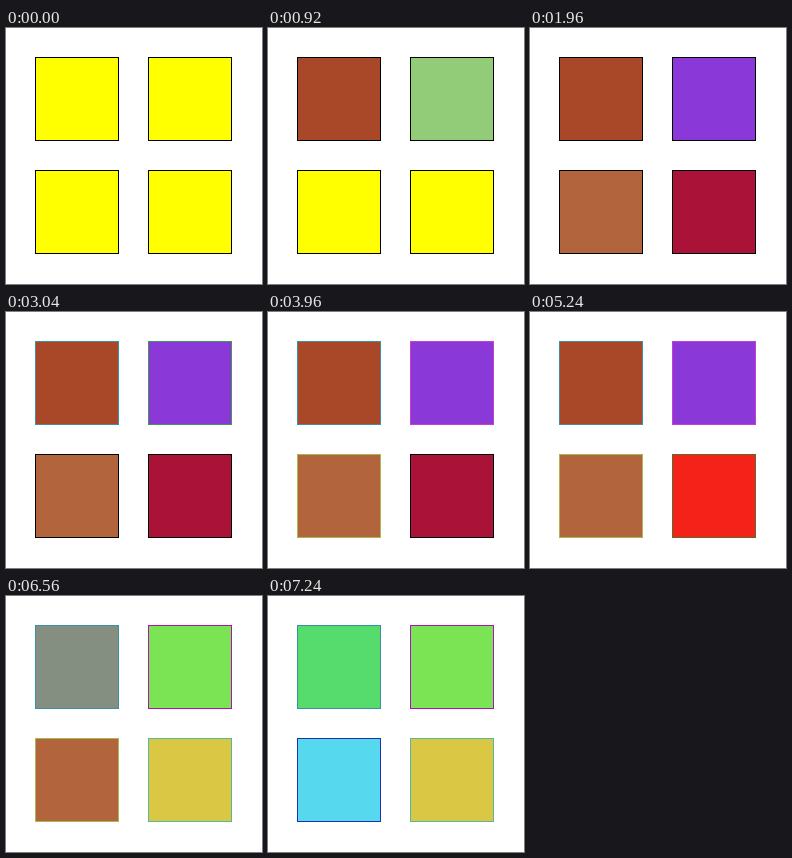
An HTML page with a canvas that plays this animation: 256 by 256 pixels, repeating every 7.32 s.

```html
<!DOCTYPE html>
<html lang="en">
<head>
<meta charset="utf-8">
<title>Four squares</title>
<style>
  html, body { margin: 0; width: 100%; height: 100%; overflow: hidden; background: #fff; }
  canvas { display: block; }
</style>
</head>
<body>
<canvas width="256" height="256"></canvas>
<script>
const ctx = document.querySelector('canvas').getContext('2d');
const LOOP = 7320, TICK = 40, SIZE = 83;
const TL = 0, TR = 1, BL = 2, BR = 3;

// Each run flickers through random colours and settles on the last one:
// [square, property, start, end, steps, settled colour]
const runs = [
  [TL, 'fill', 160, 240, 2, '#a84828'],
  [TR, 'fill', 440, 920, 8, '#92cc78'],
  [TR, 'fill', 960, 1160, 3, '#8a38d8'],
  [BR, 'fill', 1240, 1520, 4, '#aa1238'],
  [BL, 'fill', 1720, 1960, 5, '#b2643c'],
  [TL, 'line', 2320, 2640, 6, '#3c90a4'],
  [TR, 'line', 2840, 3360, 9, '#c83cd0'],
  [BL, 'line', 3560, 3960, 7, '#a8b850'],
  [BR, 'line', 4080, 5040, 15, '#5c6c30'],
  [BR, 'fill', 5240, 5240, 1, '#f42218'],
  [BR, 'line', 5320, 5320, 1, '#54b8a0'],
  [BR, 'fill', 5320, 5440, 3, '#dac844'],
  [TR, 'line', 5760, 5760, 1, '#b010b8'],
  [TR, 'fill', 5760, 5960, 4, '#8ee8fa'],
  [TR, 'fill', 6040, 6240, 4, '#7ae454'],
  [TL, 'fill', 6320, 6680, 6, '#56dc6c'],
  [BL, 'line', 6760, 6760, 1, '#2030a8'],
  [BL, 'fill', 6760, 7240, 8, '#56d8ee'],
];

let seed = 7;
const random = () => (seed = seed * 16807 % 2147483647) / 2147483647;
const channel = () => Math.floor(random() * 256);
const randomColor = () => `rgb(${channel()},${channel()},${channel()})`;

const changes = runs.flatMap(([square, prop, start, end, steps, settled]) =>
  Array.from({ length: steps }, (_, i) => ({
    square, prop,
    time: start + Math.round((end - start) * i / Math.max(1, steps - 1) / TICK) * TICK,
    color: i === steps - 1 ? settled : randomColor(),
  })));

function draw(now) {
  const t = now % LOOP;
  const squares = Array.from({ length: 4 }, () => ({ fill: '#ff0', line: '#000' }));
  for (const c of changes) if (c.time <= t) squares[c.square][c.prop] = c.color;

  ctx.fillStyle = '#fff';
  ctx.fillRect(0, 0, 256, 256);
  squares.forEach(({ fill, line }, i) => {
    const x = 29.5 + (i % 2) * 113, y = 29.5 + (i >> 1) * 113;
    ctx.fillStyle = fill;
    ctx.strokeStyle = line;
    ctx.fillRect(x, y, SIZE, SIZE);
    ctx.strokeRect(x, y, SIZE, SIZE);
  });
}

const began = performance.now();
function frame() {
  draw(performance.now() - began);
  requestAnimationFrame(frame);
}
frame();
</script>
</body>
</html>
```
